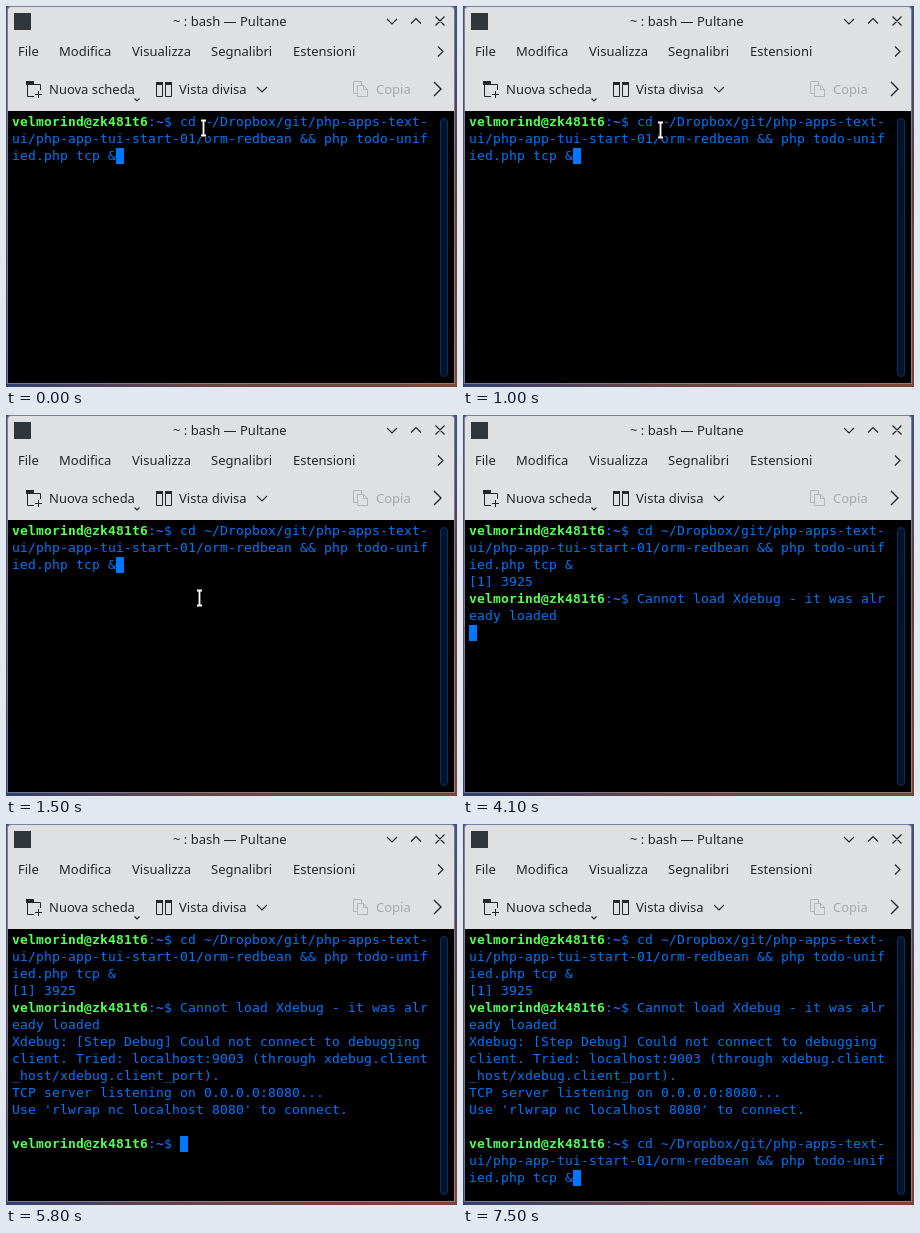
Write an HTML page that moves like this. It is 451 by 381 pixels and loops after 8 s.

```html
<!DOCTYPE html>
<html lang="it">
<head>
<meta charset="utf-8">
<title>Terminal</title>
<style>
  html, body { margin: 0; width: 100%; height: 100%; overflow: hidden; }
  #stage {
    position: relative; width: 451px; height: 381px; overflow: hidden;
    background:
      linear-gradient(90deg, #33406e, #6a4446 45%, #7c4636) 0 377px / 100% 4px no-repeat,
      linear-gradient(#4a5070, #5a4c66 50%, #34427a) 0 0 / 2px 100% no-repeat,
      linear-gradient(#41527d, #5e3c40 45%, #7c4636);
  }
  #stage > * { position: absolute; }
  #win {
    left: 1px; top: 0; width: 448px; height: 378px; box-sizing: border-box;
    background: #dee0e2 padding-box; border: 1px solid rgba(170, 178, 190, .5);
    border-radius: 4px 4px 0 0;
  }
  #term { left: 2px; top: 105px; width: 446px; height: 272px; background: #000; }
  #bar {
    left: 434px; top: 112px; width: 8px; height: 259px; box-sizing: border-box;
    background: #00152c; border: 1px solid #003468; border-radius: 4px;
  }
  .ui { font: 13px/18px "Noto Sans", sans-serif; color: #232629; white-space: pre; }
  .off { color: #a5a8ab; }
  .row {
    font: 13px/15px "DejaVu Sans Mono", monospace;
    letter-spacing: calc(8px - 1ch);
    color: #07f; white-space: pre;
  }
  .row b { color: #54ff54; }
  .row b + b { color: #5454ff; }
  #block { width: 8px; height: 16px; background: #07f; }
  svg { left: 0; top: 0; fill: none; stroke: #232629; }
</style>
</head>
<body>
<div id="stage">
  <div id="win"></div>
  <div id="term"></div>
  <div id="bar"></div>
  <svg width="451" height="381">
    <rect x="8" y="7" width="17" height="17" fill="#31363b" stroke="none"/>
    <g stroke-width="1.15">
      <path d="M381 13l5 5 5-5M405 17.500l5-5 5 5M429.500 10.500l9 9M438.500 10.500l-9 9"/>
      <path d="M432 40.500l5 5-5 5M251 81l5 5 5-5M128.500 92.500l2.500 2.500 2.500-2.500"/>
      <path d="M428 76l7 7-7 7" stroke-width="1.4"/>
    </g>
    <path d="M28 90.500H21.500V78.500H34.500V84M29 88.500H36M32.500 85V92"/>
    <path d="M150.500 76.500h6v14h-6zM159.500 76.500h6v14h-6z"/>
    <path d="M20 75h8v4h-8zM150 76h7v3h-7zM159 76h7v3h-7z" fill="#232629" stroke="none"/>
    <path d="M351 87.500H347.500V75.500H355.500V79M351.500 79.500H357.500L361.500 83.500V90.500H351.500zM357.500 79.500V83.500H361.500" stroke="#b3b6b8"/>
  </svg>
  <div id="block"></div>
  <svg id="beam" width="9" height="18">
    <path d="M2 1.500H7M4.500 1.500V16.500M2 16.500H7" stroke="#000" stroke-width="3.500" stroke-linecap="square"/>
    <path d="M2 1.500H7M4.500 1.500V16.500M2 16.500H7" stroke="#fff" stroke-width="1.8"/>
  </svg>
</div>
<script>
const LOOP = 8000, CELL = 8, LINE = 17, LEFT = 6, TOP = 108;
const stage = document.getElementById('stage');
const block = document.getElementById('block');
const beam = document.getElementById('beam');

function place(el, x, y) {
  el.style.left = x + 'px';
  el.style.top = y + 'px';
}

function add(cls, x, y, html) {
  const el = document.createElement('div');
  el.className = cls;
  el.innerHTML = html;
  place(el, x, y);
  stage.insertBefore(el, beam);
  return el;
}

const labels = [
  ['~ : bash — Pultane', 167, 6],
  ['File', 12, 36], ['Modifica', 53, 36], ['Visualizza', 126, 36],
  ['Segnalibri', 205, 36], ['Estensioni', 287, 36],
  ['Nuova scheda', 43, 74], ['Vista divisa', 173, 74], ['Copia', 370, 74, ' off']
];
labels.forEach(([text, x, y, extra = '']) => add('ui' + extra, x, y, text));

const prompt = '<b>velmorind@zk481t6</b>:<b>~</b>$ ';
const command = [
  'cd ~/Dropbox/git/php-apps-text-',
  'ui/php-app-tui-start-01/orm-redbean &amp;&amp; php todo-unif',
  'ied.php tcp &amp;'
];

// [time, first row, first column, lines]
const output = [
  [0, 0, 0, [prompt + command[0], command[1], command[2]]],
  [4100, 3, 0, ['[1] 3925', prompt + 'Cannot load Xdebug - it was alr', 'eady loaded']],
  [4200, 6, 0, [
    'Xdebug: [Step Debug] Could not connect to debugging',
    'client. Tried: localhost:9003 (through xdebug.client',
    '_host/xdebug.client_port).',
    'TCP server listening on 0.0.0.0:8080...',
    "Use 'rlwrap nc localhost 8080' to connect."
  ]],
  [5800, 12, 0, [prompt]],
  [7500, 12, 21, [command[0]]],
  [7500, 13, 0, [command[1], command[2]]]
];
const rows = output.flatMap(([time, row, col, lines]) => lines.map((html, i) => ({
  time, el: add('row', LEFT + col * CELL, TOP + (row + i) * LINE, html)
})));

// [time, column, row] of the text cursor
const caret = [[0, 13, 2], [4100, 0, 6], [4200, 0, 11], [5800, 21, 12], [7500, 13, 14]];
// [time, x, y] of the pointer
const pointer = [
  [0, 193, 113], [1000, 193, 115], [1100, 193, 126], [1200, 192, 142],
  [1300, 191, 157], [1400, 190, 168], [1500, 189, 174]
];
const at = (steps, t) => steps.filter(s => s[0] <= t).pop();

const start = performance.now();
function draw() {
  const t = Math.max(0, performance.now() - start) % LOOP;
  rows.forEach(r => { r.el.style.visibility = t >= r.time ? 'visible' : 'hidden'; });
  const [, col, row] = at(caret, t);
  place(block, LEFT + col * CELL, TOP + row * LINE);
  const [, x, y] = at(pointer, t);
  place(beam, x, y);
  beam.style.visibility = t < 4100 ? 'visible' : 'hidden';
  requestAnimationFrame(draw);
}
draw();
</script>
</body>
</html>
```
